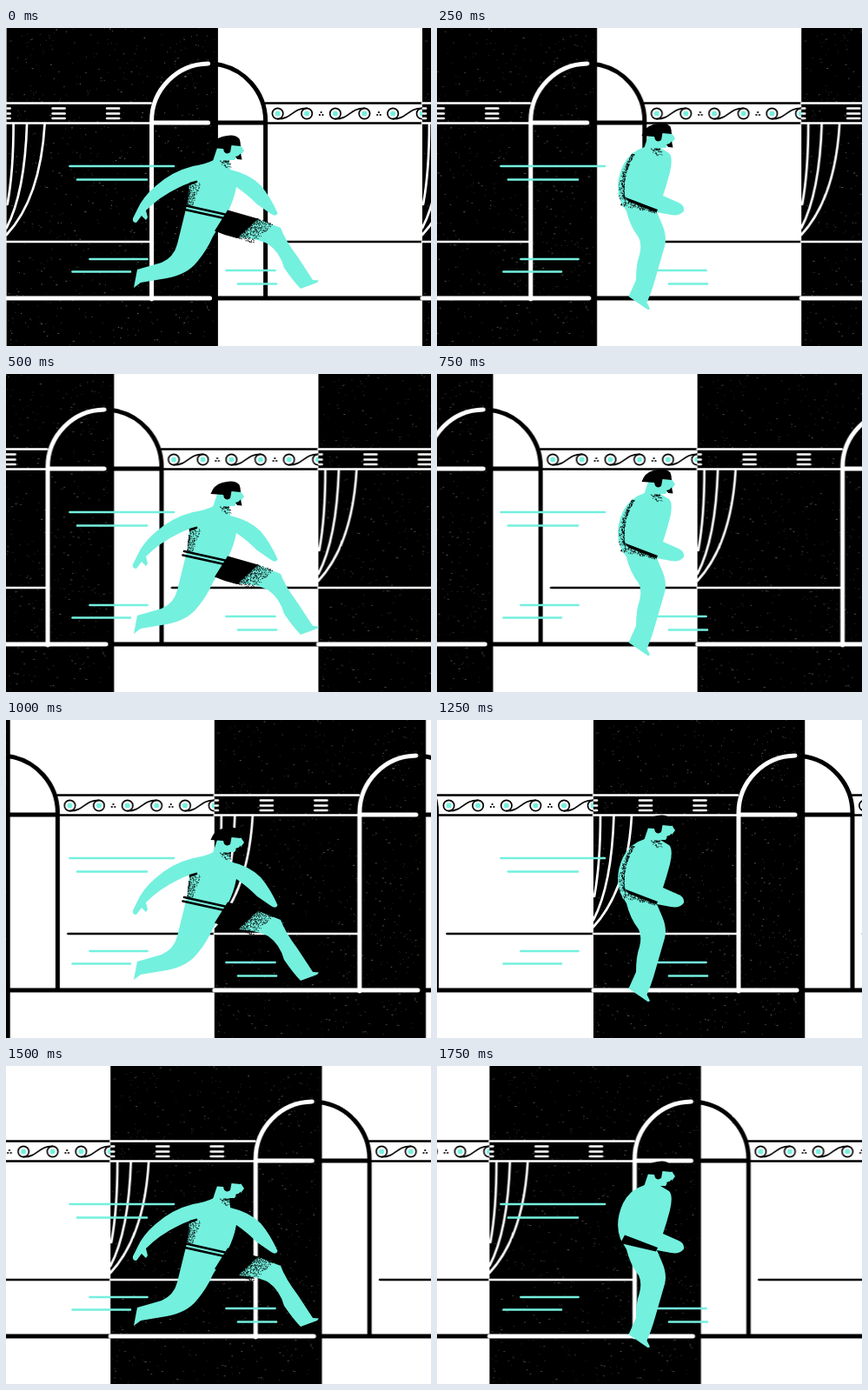
Write an HTML page that moves like this. It is 489 px wide and 366 px high and loops after 2000 ms.

```html
<!DOCTYPE html>
<html lang="en">
<head>
<meta charset="utf-8">
<title>Runner</title>
<style>
  html, body { margin: 0; width: 100%; height: 100%; overflow: hidden; background: #fff; }
  svg { display: block; width: 100vw; height: 100vh; }
  .scroll { animation: scroll 2s steps(8) infinite; }
  .stride { animation: first .5s step-end infinite; }
  .pass { animation: second .5s step-end infinite; }
  .pass .shade { animation: last 2s step-end infinite; }
  .line { fill: none; stroke-linecap: round; stroke-linejoin: round; stroke-width: 2.7; }
  .thick { stroke-width: 5; }
  .thin { stroke-width: 1.7; }
  .white { stroke: #fff; }
  .black { stroke: #000; }
  .skin { fill: #74f0de; }
  .speed { stroke: #74f0de; }
  .grain { fill: none; stroke: #000; stroke-width: .9; }
  .specks { fill: none; stroke: #fff; stroke-width: .7; opacity: .55; }
  @keyframes scroll { to { transform: translateX(-478.4px); } }
  @keyframes first { 0% { opacity: 1; } 50%, 100% { opacity: 0; } }
  @keyframes second { 0% { opacity: 0; } 50%, 100% { opacity: 1; } }
  @keyframes last { 0% { opacity: 1; } 87.5%, 100% { opacity: 0; } }
</style>
</head>
<body>
<svg viewBox="0 0 489 366" preserveAspectRatio="none">
  <defs>
    <filter id="rough" filterUnits="userSpaceOnUse" x="-6" y="-6" width="496" height="378" color-interpolation-filters="sRGB">
      <feTurbulence type="fractalNoise" baseFrequency=".4" numOctaves="1" seed="4"/>
      <feDisplacementMap in="SourceGraphic" scale="1.5" xChannelSelector="R" yChannelSelector="G"/>
    </filter>

    <g id="scroll-motif">
      <path class="line black thin" d="M312 104.7C328 105 329 92 345.5 92.3"/>
      <g class="line black thin">
        <circle cx="312" cy="98.5" r="6.2"/>
        <circle cx="345.5" cy="98.5" r="6.2"/>
      </g>
      <g class="skin">
        <circle cx="312" cy="98.5" r="3"/>
        <circle cx="345.5" cy="98.5" r="3"/>
      </g>
      <path class="line black" style="stroke-width:2.2" d="M362 97h.1M360.3 100h.1M363.8 100h.1"/>
    </g>

    <g id="tile">
      <g filter="url(#rough)">
        <rect y="-5" width="243.3" height="376"/>
        <!-- room on the light side -->
        <path class="line black" d="M298 86.5H478M298 109.5H478M310 246H478"/>
        <path class="line black thick" d="M243 311H478M242 109H298M240 41.5A66 66 0 0 1 298 107V311"/>
        <!-- room on the dark side -->
        <path class="line white" d="M0 86.5H166M0 109.5H166M0 246H166"/>
        <path class="line white thick" d="M0 311H234M167 109H232M232 41A66 66 0 0 0 167 107V312"/>
        <path class="line white" d="M8 110Q8 165 1 203M23.500 110Q21 190 0 230M44 110Q39 196 0 238"/>
        <path id="dashes" class="line white" d="M53 92.5H67M53 98.500H67M53 104H67"/>
        <use href="#dashes" x="62.500"/>
        <path class="line white" d="M1 92.5H4M1 98.500H4M1 104H4"/>
      </g>
      <use href="#scroll-motif"/>
      <use href="#scroll-motif" x="66.300"/>
      <g clip-path="url(#edge)"><use href="#scroll-motif" x="132.600"/></g>
      <path id="specks" class="specks"/>
    </g>
    <clipPath id="edge"><rect x="430" y="80" width="48.400" height="40"/></clipPath>

    <g id="head">
      <path class="skin" d="M243 138L238 153L244 166L258 165L257 152L263 152L266 147H270L271 145L274 141L270 135L259 134Z"/>
      <path d="M235.500 138Q239 127.500 249 125Q263 121 268.500 127.500Q270 131 270 136L259.500 135L258 143Q254 146 251 142.500L250 139Z"/>
      <path d="M264 148Q268 147.500 270 144.500L271.500 151.500L266 151Z"/>
    </g>
  </defs>

  <rect width="489" height="366" fill="#fff"/>
  <g class="scroll">
    <use href="#tile" x=".6"/>
    <use href="#tile" x="479"/>
  </g>

  <path class="line speed" d="M73.500 159H193M82 174.500H162M96.500 266H162.500M76.500 280.500H143M253.500 279H309.500M267 294.500H311"/>

  <g class="stride">
    <path class="skin" d="M239 152Q229 157 215 159Q191 165 172 182Q157 195 151 209L146 219Q145 224 150 224L156 216L161 221L163 218L161 210Q177 194 198 184Q209 178 219 177L211 179L209 200Q202 229 197 249Q193 264 179 270L151 278L147 299L155 293L185 288Q208 284 220 269Q231 256 238 240L255 212Q262 199 265 183Q277 191 289 203L305 214Q311 218 312.500 213Q304 194 293 181Q280 168 258 163L256 152Z"/>
    <path class="skin" d="M288 219L316 230Q321 244 336 264L353 290L360 290.500L358 293L339 300Q331 292 320 276Q315 258 302 249Q290 242 264 241Z"/>
    <path d="M255 209.500L290 219.500L266 242Q252 239 240 233.500Z"/>
    <path class="line black" d="M205 204L252 214.500M203.500 208.500L249 218.500M212 179L219 177"/>
    <path id="thigh" class="grain"/>
    <path id="armpit" class="grain"/>
    <use href="#head"/>
    <use href="#neck"/>
  </g>

  <g class="pass">
    <path class="skin" d="M239 137Q222 142 214 158Q204 180 211 199L218 211Q222 228 232 241Q236 249 233 261Q229 272 229 290L220.500 309L243 324.500L245 323L241.500 316Q246 306 249 296L262 251Q265 240 259 226L253 212L269 215Q279 217 284 210.500Q285 204 278 201L260 193Q264 181 268 166Q272 149 267 144L257 138Z"/>
    <path d="M216 194.500L254 209L252 213.500L211 204Z"/>
    <use href="#head" y="-14"/>
    <g class="shade">
      <path class="skin" d="M208 190L216 195L221 200L252 212V214L214 206Z"/>
      <path id="back" class="grain"/>
      <path id="belt" class="grain"/>
      <use href="#neck" y="-14"/>
    </g>
  </g>

  <defs><path id="neck" class="grain"/></defs>
</svg>
<script>
  let seed = 7;
  const rnd = () => (seed = seed * 16807 % 2147483647) / 2147483647;

  // Fill a path with short marks placed by a rule of two random numbers.
  function scatter(id, count, place, size = () => .9) {
    let d = '';
    for (let i = 0; i < count; i++) {
      const [x, y] = place(rnd(), rnd());
      d += `M${x.toFixed(1)} ${y.toFixed(1)}h${size().toFixed(1)}`;
    }
    document.getElementById(id).setAttribute('d', d);
  }

  scatter('specks', 800, (u, v) => [2 + u * 238, v * 366], () => .4 + rnd() ** 4 * 1.6);
  scatter('neck', 50, (u, v) => [246 + 11 * u + 2 * v, 153 + 12 * v * v * (.4 + .6 * u)]);
  scatter('armpit', 150, (u, v) => [211 - 3 * v + (13 - 6 * v) * u * u, 179 + 25 * v]);
  scatter('thigh', 420, (u, v) => {
    const x = 288 - 24 * v + 20 * u ** 2;
    return [x, 219 + (x - 288 + 24 * v) * .35 + 22 * v];
  });
  // Darkest along the arm, thinning out towards the back.
  scatter('back', 260, (u, v) => {
    const arm = 227 - 11 * v - 20 * v * (1 - v);
    return [arm - (3 + 4 * v) * u ** 1.6, 145 + 52 * v];
  });
  scatter('belt', 170, (u, v) => [214 + 37 * u, 196 + 14 * u + (9 - 6 * u) * v ** 1.5]);
</script>
</body>
</html>
```
